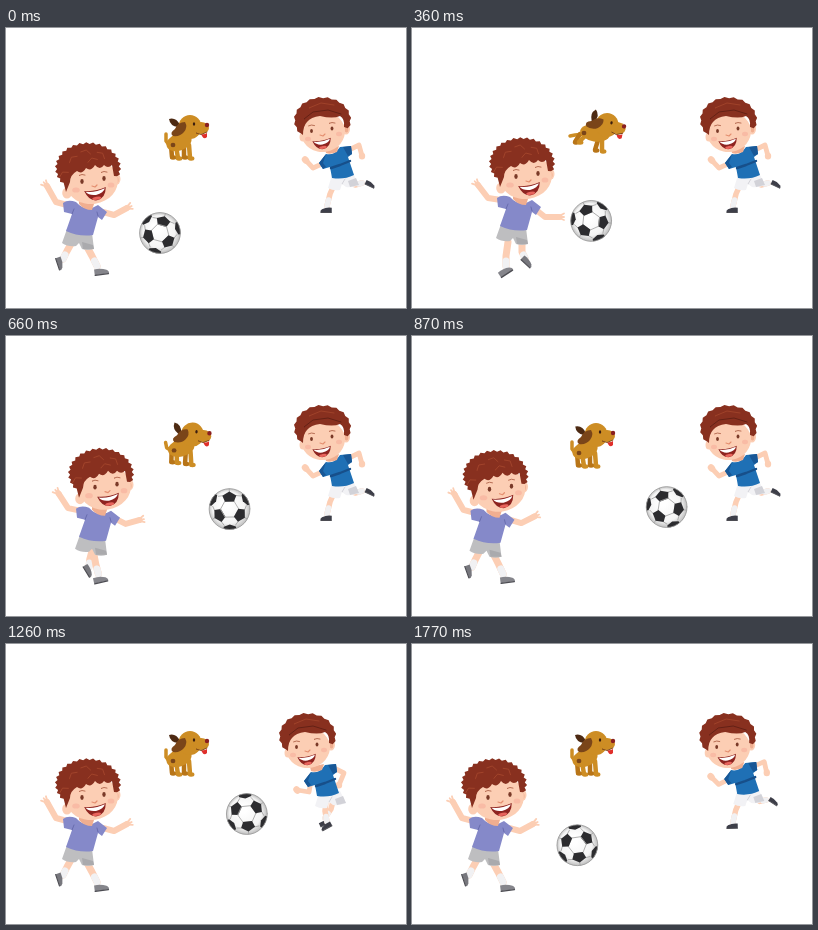
Write an HTML page with a canvas that moves like this. It is 400 px wide and 280 px high and loops after 1.8 s.

```html
<!DOCTYPE html>
<html lang="en">
<head>
<meta charset="utf-8">
<title>Kids playing football</title>
<style>
html, body { margin: 0; width: 100%; height: 100%; overflow: hidden; background: #fff; }
canvas { display: block; }
</style>
</head>
<body>
<canvas width="400" height="280"></canvas>
<script>
const LOOP = 1800, HALF = 900, FRAME = 30;
const SKIN = '#fcceb4', SHADE = '#f0ae90', HAIR = '#88301f', DARK = '#5b1d14';
const ctx = document.querySelector('canvas').getContext('2d');

const clamp = (v, a, b) => Math.min(b, Math.max(a, v));
const mix = (a, b, k) => a.map((v, i) => v + (b[i] - v) * k);

function fill(d, color) {
  ctx.fillStyle = color;
  ctx.fill(new Path2D(d));
}
function oval(x, y, rx, ry, color, turn = 0) {
  ctx.beginPath();
  ctx.ellipse(x, y, rx, ry, turn, 0, 7);
  ctx.fillStyle = color;
  ctx.fill();
}
function limb(points, width, color) {
  ctx.beginPath();
  points.forEach(p => ctx.lineTo(...p));
  ctx.lineWidth = width;
  ctx.strokeStyle = color;
  ctx.lineCap = ctx.lineJoin = 'round';
  ctx.stroke();
}
function at(x, y, turn, draw) {
  ctx.save();
  ctx.translate(x, y);
  ctx.rotate(turn);
  draw();
  ctx.restore();
}

// Curly outer edge over an ellipse, closed by a hairline
function hair(x, y, rx, ry, from, to, curls, depth, line) {
  let d = '';
  for (let i = 0; i <= curls * 2; i++) {
    const a = (from + (to - from) * i / curls / 2) * Math.PI / 180;
    const r = i % 2 ? 1 + depth : 1 - depth;
    d += (d ? 'L' : 'M') + (x + rx * r * Math.cos(a)) + ' ' + (y + ry * r * Math.sin(a));
  }
  fill(d + line + 'Z', HAIR);
}
function hand([x, y], turn) {
  at(x, y, turn, () => {
    oval(0, 0, 3.6, 2.8, SKIN);
    for (const s of [-.7, 0, .6]) limb([[1, s * 2], [5, s * 5]], 1.8, SKIN);
  });
}
function shoe(x, y, turn, size, color, flip = 1) {
  at(x, y, turn, () => {
    ctx.scale(size * flip, size);
    fill('M-7 3V-3Q0 -4 6 -1Q9 1 8 3Z', color);
    limb([[-6.5, 3.2], [7.5, 3.2]], 1.4, '#4c4c52');
  });
}
function leg(hip, knee, ankle, width) {
  limb([hip, knee, ankle], width, SKIN);
  limb([mix(knee, ankle, .5), ankle], width, '#f1f1f3');
}
function smile(x, y, size) {
  at(x, y, -.18, () => {
    ctx.scale(size, size);
    fill('M-11 -3Q0 0 11 -3Q9 8 0 8.5Q-8 8 -11 -3Z', '#8e2420');
    fill('M-9.8 -2Q0 .8 9.8 -2Q8 2.6 0 3Q-7 2.6 -9.8 -2Z', '#fff');
    oval(0, 6.4, 4.5, 1.6, '#e8645c');
  });
}
function eye(x, y, s) {
  oval(x, y, 1.7 * s, 2.4 * s, '#7a3a28');
  limb([[x - 3, y - 6 * s], [x, y - 7 * s], [x + 3, y - 6.4 * s]], .9, '#b0644a');
}

function kicker(k) {
  const dx = 28 * k, dy = -5 * k;
  leg(mix([66, 214], [110, 213], k), mix([61, 223], [110, 224], k), mix([57, 231], [113, 230], k), 7);
  shoe(...mix([54, 235], [115, 233.5], k), 1.25 - .5 * k, .85, '#77777d');
  leg(mix([80, 217], [96, 214], k), mix([86, 228], [94, 228], k), mix([91, 238], [94, 238], k), 7);
  shoe(...mix([95, 243.5], [93, 243.5], k), -.13 - .45 * k * k, .95, '#85858b');

  const left = mix([41, 158], [66, 157], k), right = mix([121, 180], [147, 189], k);
  limb([mix([61, 177], [89, 172], k), mix([50, 174], [76, 170], k), left], 6, SKIN);
  hand(left, -2.3);
  limb([mix([97, 184], [123, 181], k), mix([108, 187], [133, 189], k), right], 6, SKIN);
  hand(right, -.4 + .4 * k);

  ctx.save();
  ctx.translate(dx, dy);
  fill('M61 201L86 205L88 221Q82 223 76 221L73 215L70 218Q62 219 56 215Z', '#bebec0');
  fill('M76 214L87 217L88 221L77 221Z', '#aaaaad');
  fill('M70 174Q62 171 57 175L58 184L66 186L60 203Q73 209 87 207L92 189L96 192L101 184L92 177Q80 185 70 174Z', '#8589c9');
  limb([[66, 186], [68, 181]], 1, '#686cae');
  limb([[92, 188], [91, 184]], 1, '#686cae');
  fill('M73 172L89 173L86 182Q78 182 73 176Z', SHADE);

  oval(61, 165, 4.8, 5.5, SKIN);
  oval(110, 151, 4.5, 6, SKIN);
  oval(110.5, 152, 2, 3.2, SHADE);
  oval(86, 154, 26, 22, SKIN, -.15);
  hair(82, 140, 32, 25, 142, 380, 20, .035,
    'L108 148L106 137Q102 141 98 137Q94 143 89 137Q85 144 80 140Q76 147 71 143Q64 147 64 154L60 164');
  for (const [x, y, r] of [[66, 130, -.7], [80, 123, .2], [96, 126, .7], [57, 145, -.5], [86, 131, -.3]])
    at(x, y, r, () => limb([[-5, 2], [0, -1], [5, 2]], .8, '#a5472d'));
  eye(76, 153.5, 1);
  eye(98, 150.5, 1);
  limb([[86, 158], [89, 159], [91, 157]], 1.2, '#e48f70');
  oval(70, 162, 3.8, 2.6, '#f9bba5');
  oval(105, 157, 3.4, 2.6, '#f9bba5');
  smile(89.5, 164, 1);
  ctx.restore();
}

function runner(k) {
  const elbow = mix([353, 117], [338, 129], k), rear = mix([356, 128], [333, 141], k);
  limb([mix([343, 122], [328, 124], k), elbow, rear], 4.8, SKIN);
  oval(...rear, 3.2, 3.6, SKIN);

  leg(mix([343, 153], [328, 153], k), mix([349, 157], [325, 165], k), mix([356, 155], [319, 174], k), 5.5);
  shoe(...mix([364, 156], [318, 179], k), .45 + 3.2 * k * (1 - k) - .9 * k, .68, '#3d3e48');
  leg(mix([328, 157], [320, 158], k), mix([324, 166], [319, 167], k), [321, 178], 5.5);
  shoe(320.5, 182, -.5 * k, .75, '#3d3e48', -1);

  ctx.save();
  ctx.translate(-13 * k, 2 * k);
  fill('M326 147L347 145L353 157Q346 160 340 159L336 156L334 162Q327 163 322 160Z', '#f2f2f5');
  limb([[336, 156], [339, 151]], 1, '#d4d4da');
  fill('M342 153L350 150L353 157L344 159Z', '#d2d2d8');
  ctx.restore();

  const front = mix([299.5, 132], [291, 146], k);
  limb([mix([318, 135], [305, 137], k), mix([307, 140], [303, 148], k), front], 4.8, SKIN);
  at(...front, -2.3, () => oval(0, 0, 4, 3.4, SKIN));

  ctx.save();
  ctx.translate(-15 * k, 2 * k);
  fill('M320 126L313 135L317 141L324 139L326 150Q338 152 348 147L342 129L346 126L345 118L334 119Q328 128 320 126Z', '#1f70b5');
  fill('M320 126L313 135L317 141L320 139L317 135ZM337 119L345 118L346 126L342 128Z', '#185796');
  limb([[325, 140], [334, 137], [344, 133]], 2.4, '#174f8a');
  fill('M319 121L333 118L331 124Q324 127 320 125Z', SHADE);
  ctx.restore();

  ctx.save();
  ctx.translate(-15 * k, 0);
  oval(297, 109, 3.5, 4.5, SKIN);
  oval(340, 101, 4, 5.5, SKIN);
  oval(340.5, 101.5, 1.8, 3, SHADE);
  oval(317, 104, 22, 20, SKIN, -.15);
  hair(316.5, 92, 28, 22.5, 142, 382, 13, .028,
    'L338 99Q339 91 334 88Q327 91 314 88Q305 89 301 94Q297 98 297 107Z');
  limb([[298, 91], [307, 84], [322, 82], [335, 86]], .8, DARK);
  limb([[303, 80], [315, 75], [328, 77]], .8, '#a5472d');
  eye(305.5, 103, .85);
  eye(326, 100.5, .85);
  limb([[314, 107], [317, 108], [319, 106]], 1.1, '#e48f70');
  oval(302, 111, 3, 2.2, '#f9bba5');
  oval(333, 106, 3, 2.2, '#f9bba5');
  smile(316, 114, .85);
  ctx.restore();
}

function dog(k) {
  const gold = '#cd8d24', shade = '#b87518', brown = '#7a4519';
  const paws = [
    [[165, 117], [166, 129], [168, 106], [163, 114]],
    [[170, 118], [172, 130], [173, 108], [167, 114]],
    [[178, 118], [178, 129], [186, 112], [183, 122]],
    [[183, 117], [184, 130], [190, 111], [190, 123]]
  ];
  limb([mix([163, 117], [172, 106], k), mix([160, 113], [163, 107], k), mix([160, 106], [158, 108], k)], 3.5, gold);
  paws.forEach(([a, b, c, d], i) => {
    const end = mix(b, d, k);
    const color = i % 2 ? gold : shade;
    limb([mix(a, c, k), end], 4.5, color);
    oval(end[0] + 1.2, end[1] + .5, 3.2, 2.2, color);
  });
  oval(...mix([173, 114], [183, 105], k), 13 + 2 * k, 8.5, gold, -.35 + .5 * k);
  oval(...mix([167, 117], [172, 105], k), 2.4, 2.2, brown);
  const [hx, hy] = mix([184, 99], [195, 97], k);
  at(hx, hy, .2 * k, () => {
    at(-13, -4, Math.sqrt(k), () => fill('M3 2Q-1 -6 -8 -4Q-7 3 1 4Z', '#4d2a13'));
    oval(0, 0, 11.5, 12, gold);
    oval(11, 1, 8, 6, gold);
    fill('M11 7Q14 8 17 6L17 10Q14 13 12 9Z', '#e02f2b');
    limb([[6, 6], [11, 7.5], [17, 5]], .9, brown);
    oval(17, -2, 2.2, 2.2, '#8a1f20');
    oval(4, -3, 1.2, 1.7, '#3b1e10');
    at(-6, -3, .3 * k, () => fill('M1 -2Q-6 -2 -9 5Q-15 9 -11 12Q-4 13 0 8Q4 3 1 -2Z', brown));
  });
}

function ball(x) {
  const path = [[154, 205], [166, 201], [179, 193], [201, 179], [224, 173], [241, 170], [254, 171], [267, 173]];
  const i = clamp(path.findIndex(p => p[0] >= x), 1, path.length - 1);
  const [a, b] = [path[i - 1], path[i]];
  const y = mix(a, b, (x - a[0]) / (b[0] - a[0]))[1];
  at(x, y, 0, () => {
    const g = ctx.createRadialGradient(-4, -5, 4, 0, 0, 21);
    g.addColorStop(0, '#fff');
    g.addColorStop(.7, '#f4f4f4');
    g.addColorStop(1, '#b9b9b9');
    oval(0, 0, 20.5, 20.5, g);
    ctx.save();
    ctx.beginPath();
    ctx.arc(0, 0, 20.5, 0, 7);
    ctx.clip();
    // One full turn over the whole path
    ctx.rotate(-1.3 + (x - 154) / 112 * 2 * Math.PI);
    for (let n = 0; n < 3; n++) {
      limb([[8, 4.5], [0, 9.2], [-8, 4.5]], .8, '#a4a4a4');
      limb([[16.5, 0], [21, 0]], .8, '#a4a4a4');
      for (const s of [-1, 1]) limb([[13.5, 6.5 * s], [13, 11 * s]], .8, '#a4a4a4');
      fill('M7.5 -4.5L13.5 -7L17.5 0L13.5 7L7.5 4.5Z', '#2c2c2f');
      ctx.rotate(Math.PI / 3);
      fill('M15.5 0L17.5 -6L22 -7V7L17.5 6Z', '#2c2c2f');
      ctx.rotate(Math.PI / 3);
    }
    ctx.restore();
    ctx.beginPath();
    ctx.arc(0, 0, 20.4, 0, 7);
    ctx.lineWidth = .8;
    ctx.strokeStyle = '#999';
    ctx.stroke();
  });
}

// Quick swing forward, short hold, steady return
const swing = t => clamp(Math.min(t / 300, (897 - t) / 510), 0, 1);
const roll = t => clamp((t - 190) * .148, 0, 112);

const start = performance.now();
function draw() {
  const t = Math.floor((performance.now() - start) % LOOP / FRAME) * FRAME;
  const k = swing(t);
  ctx.fillStyle = '#fff';
  ctx.fillRect(0, 0, 400, 280);
  dog(k * k);
  runner(swing(t - HALF));
  kicker(k);
  ball(154 + roll(t) - roll(t - HALF));
  requestAnimationFrame(draw);
}
draw();
</script>
</body>
</html>
```
